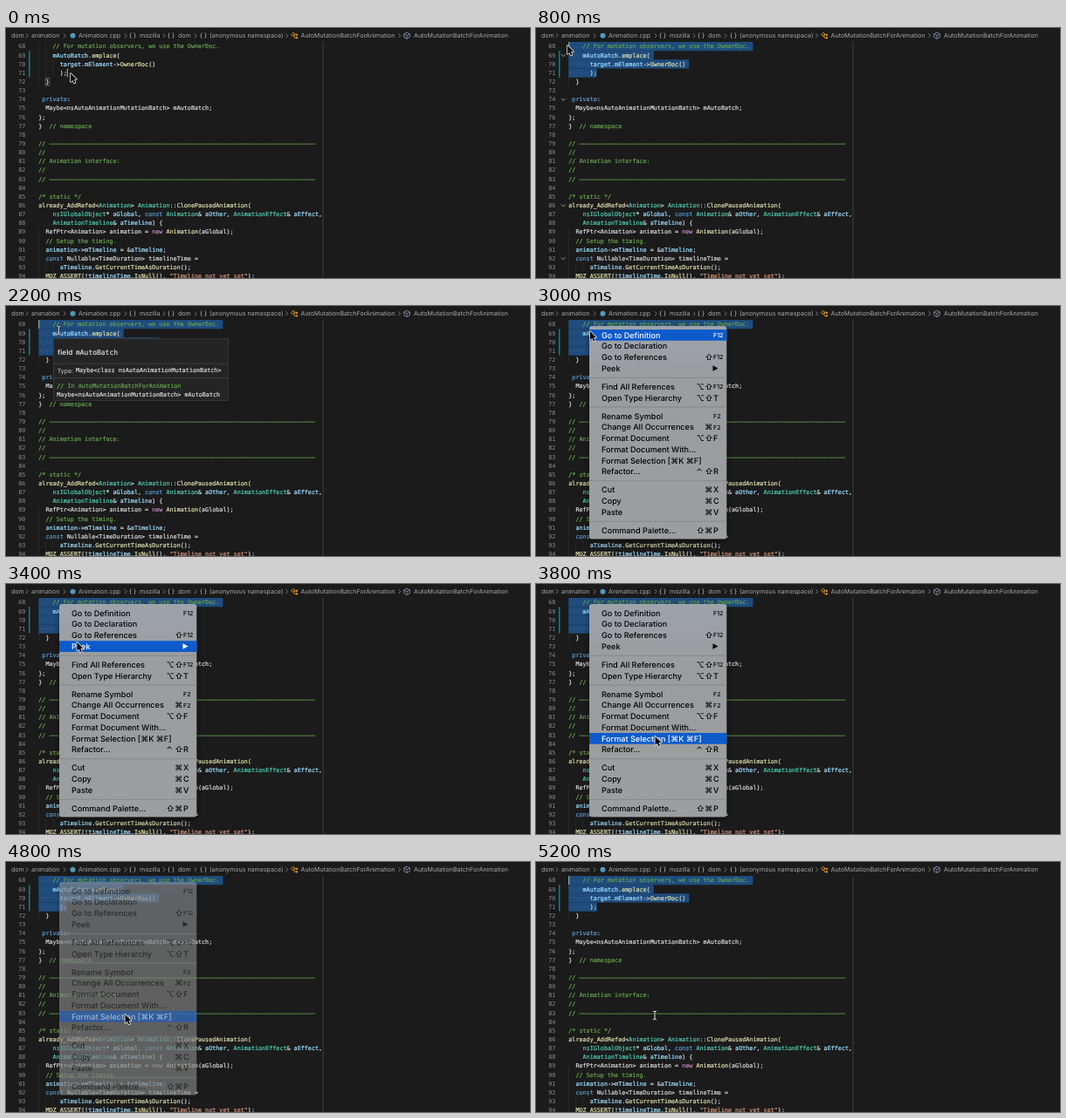
Write an HTML page with a canvas that moves like this. It is 600 by 287 pixels and loops after 5400 ms.

```html
<!DOCTYPE html>
<html lang="en">
<head>
<meta charset="utf-8">
<title>Code editor</title>
<style>
html, body { margin: 0; width: 100%; height: 100%; overflow: hidden; background: #1b1b1b; }
canvas { display: block; width: 600px; height: 287px; }
</style>
</head>
<body>
<canvas id="stage"></canvas>
<script>
const W = 600, H = 287, LOOP = 5400, STEP = 200;
const CW = 4.06, LH = 10.14, X0 = 37.3, FIRST = 68, TOP = 16;
const MONO = '"DejaVu Sans Mono", monospace', SANS = 'Inter, "DejaVu Sans", sans-serif';
const BG = '#1b1b1b';

const canvas = document.getElementById('stage');
const ctx = canvas.getContext('2d');
const dpr = window.devicePixelRatio || 1;
canvas.width = W * dpr;
canvas.height = H * dpr;

// First letter of each token picks its colour
const INK = {
  c: '#62a04a', w: '#d4d4d4', v: '#9cdcfe', f: '#dcdcaa',
  k: '#569cd6', t: '#4ec9b0', n: '#c586c0', s: '#ce9178'
};
const RULE = 'c// ' + '—'.repeat(75);
const CODE = [
  'w    |c// For mutation observers, we use the OwnerDoc.',
  'w    |vmAutoBatch|w.|femplace|w(',
  'w      |vtarget|w.|vmElement|w->|fOwnerDoc|w()',
  'w      );',
  'w  }',
  '',
  'w |kprivate|w:',
  'w  Maybe<nsAutoAnimationMutationBatch> mAutoBatch;',
  'w};',
  'w}  |c// namespace',
  '',
  RULE,
  'c//',
  'c// Animation interface:',
  'c//',
  RULE,
  '',
  'c/* static */',
  'falready_AddRefed|w<|tAnimation|w> |tAnimation|w::|fClonePausedAnimation|w(',
  'w    |tnsIGlobalObject|w* |vaGlobal|w, |kconst |tAnimation|w& |vaOther|w, |tAnimationEffect|w& |vaEffect|w,',
  'w    |tAnimationTimeline|w& |vaTimeline|w) {',
  'w  RefPtr<Animation> animation = |nnew |fAnimation|w(aGlobal);',
  'w  |c// Setup the timing.',
  'w  |vanimation|w->|vmTimeline|w = &|vaTimeline|w;',
  'w  |kconst |wNullable<TimeDuration> timelineTime =',
  'w      |vaTimeline|w.|fGetCurrentTimeAsDuration|w();',
  'w  |fMOZ_ASSERT|w(!|vtimelineTime|w.|fIsNull|w(), |s"Timeline not yet set"|w);'
].map(line => line ? line.split('|').map(p => [INK[p[0]], p.slice(1)]) : []);
const PLAIN = CODE.map(line => line.map(p => p[1]).join(''));

// Label, modifiers, key; null is a separator
const MENU = [
  ['Go to Definition', '', 'F12'], ['Go to Declaration'], ['Go to References', '⇧', 'F12'], ['Peek', '', '>'],
  null,
  ['Find All References', '⌥⇧', 'F12'], ['Open Type Hierarchy', '⌥⇧', 'T'],
  null,
  ['Rename Symbol', '', 'F2'], ['Change All Occurrences', '⌘', 'F2'], ['Format Document', '⌥⇧', 'F'],
  ['Format Document With...'], ['Format Selection [⌘K ⌘F]'], ['Refactor...', '⌃⇧', 'R'],
  null,
  ['Cut', '⌘', 'X'], ['Copy', '⌘', 'C'], ['Paste', '⌘', 'V'],
  null,
  ['Command Palette...', '⇧⌘', 'P']
];

// Mouse path: time, x, y
const PATH = [
  [0, 74, 52], [200, 74, 52], [800, 36, 20], [1000, 36, 20], [1400, 60.5, 28],
  [2400, 60.5, 28], [2600, 62, 29], [3200, 62, 29], [3800, 136.5, 175], [4800, 136.5, 175], [5000, 136, 176]
];

const rowY = i => TOP + i * LH;
const colX = c => X0 + c * CW;

function mouseAt(t) {
  const i = PATH.findIndex(p => p[0] > t);
  if (i < 0) return PATH[PATH.length - 1].slice(1);
  const [t0, x0, y0] = PATH[i - 1], [t1, x1, y1] = PATH[i];
  const u = (t - t0) / (t1 - t0), e = u * u * (3 - 2 * u);
  return [x0 + (x1 - x0) * e, y0 + (y1 - y0) * e];
}

function box(x, y, w, h, fill, r = 0) {
  ctx.fillStyle = fill;
  ctx.beginPath();
  ctx.roundRect(x, y, w, h, r);
  ctx.fill();
}

function path(points, color, width, close) {
  ctx.beginPath();
  points.forEach(([x, y], i) => i ? ctx.lineTo(x, y) : ctx.moveTo(x, y));
  if (close) ctx.closePath();
  ctx.strokeStyle = color;
  ctx.lineWidth = width;
  ctx.stroke();
}

function text(s, x, y, size, color, weight = 400) {
  ctx.font = `${weight} ${size}px ${SANS}`;
  ctx.fillStyle = color;
  ctx.fillText(s, x, y + size * 0.36);
}

// Monospaced text on a fixed cell grid, slightly emboldened
function mono(s, x, y, color, cell = CW, bold = 0.22) {
  const size = cell / 0.602, base = y + size * 0.35;
  ctx.font = `${size}px ${MONO}`;
  ctx.fillStyle = ctx.strokeStyle = color;
  ctx.lineWidth = bold;
  for (let i = 0; i < s.length; i++) {
    if (s[i] === ' ') continue;
    ctx.fillText(s[i], x + i * cell, base);
    if (bold) ctx.strokeText(s[i], x + i * cell, base);
  }
}

function breadcrumb() {
  const y = 8.7, gray = '#a9a9a9';
  const parts = [
    ['dom', 6], ['animation', 29], ['Animation.cpp', 83], ['mozilla', 153], ['dom', 197],
    ['(anonymous namespace)', 233], ['AutoMutationBatchForAnimation', 337.5], ['AutoMutationBatchForAnimation', 467]
  ];
  for (const [s, x] of parts) text(s, x, y, 7.08, gray);
  for (const x of [24, 67, 137, 181, 217, 321.5, 450.5])
    path([[x - 1.2, y - 2.5], [x + 1.2, y], [x - 1.2, y + 2.5]], '#8a8a8a', 0.8);
  for (const x of [141, 185, 222]) text('{ }', x, y, 7.2, '#c4c4c4');

  ctx.fillStyle = '#519aba';
  ctx.beginPath();
  ctx.arc(76.5, y, 3, 0, 7);
  ctx.fill();

  const orange = '#ee9d28';
  path([[326.5, y - 1], [329, y - 3.5], [330.8, y - 1.7], [328.3, y + 0.8]], orange, 0.9, true);
  path([[329.5, y - 0.8], [333, y - 0.8]], orange, 0.8);
  path([[330, y - 0.8], [330, y + 2.6], [333, y + 2.6]], orange, 0.8);
  box(332, y - 1.9, 2, 2, orange, 0.5);
  box(332, y + 1.6, 2, 2, orange, 0.5);

  const blue = '#8d9dbd', cx = 459;
  path([[cx, y - 3.6], [cx + 3.3, y - 1.8], [cx + 3.3, y + 1.9], [cx, y + 3.7], [cx - 3.3, y + 1.9], [cx - 3.3, y - 1.8]], blue, 0.8, true);
  path([[cx - 3.3, y - 1.8], [cx, y], [cx + 3.3, y - 1.8]], blue, 0.7);
  path([[cx, y], [cx, y + 3.7]], blue, 0.7);
}

function selection(row, col) {
  for (let i = row; i <= 3; i++) {
    const from = i === row ? col : 0, line = PLAIN[i];
    const to = line.length + (i < 3 ? 1 : 0);
    box(colX(from), rowY(i), (to - from) * CW, LH + 0.1, '#1f4c7d', 1);
    for (let c = from; c < line.length; c++)
      if (line[c] === ' ') box(colX(c) + 1.6, rowY(i) + 4.7, 0.9, 0.9, 'rgba(227,228,226,.17)');
  }
}

function editor(t, mouse) {
  // Indent guides
  const guide = (c, from, to) => box(colX(c), rowY(from), 0.6, (to - from) * LH, '#303030');
  guide(0, 0, 5);
  guide(2, 0, 4);
  guide(4, 2, 4);
  guide(0, 21, 27);
  guide(2, 25, 26);
  guide(4, 25, 26);

  let row = 3, col = PLAIN[3].length;
  if (t >= 200) {
    const [x, y] = t < 800 ? mouse : [36, 20];
    row = Math.max(0, Math.min(3, Math.floor((y - TOP) / LH)));
    col = Math.max(0, Math.min(PLAIN[row].length, Math.round((x - X0) / CW)));
    selection(row, col);
  } else {
    ctx.strokeStyle = '#888';
    ctx.lineWidth = 0.6;
    ctx.strokeRect(colX(2) - 0.2, rowY(4) + 0.7, CW + 0.6, LH - 1.4);
  }

  box(362.6, 16, 0.8, H, '#464646');
  CODE.forEach((line, i) => {
    const y = rowY(i) + LH / 2;
    mono(String(FIRST + i), 14.2, y, '#8c8c8c', CW, 0);
    let c = 0;
    for (const [color, s] of line) {
      mono(s, colX(c), y, color);
      c += s.length;
    }
  });
  box(26, rowY(1), 1.5, 3 * LH, '#0c7d9d');

  if (t >= 600 && t < 1400)
    for (const n of [69, 74, 86, 92]) {
      const y = rowY(n - FIRST) + LH / 2;
      path([[28.9, y - 1], [31.3, y + 1.4], [33.7, y - 1]], '#b8b8b8', 0.8);
    }
  if (t < 2600 || t >= 5000) box(colX(col), rowY(row) + 0.3, 0.9, LH - 0.4, '#c8c8c8');
}

function tooltip() {
  const x = 54, y = 37, w = 200.5, h = 72;
  box(x, y, w, h, '#454545');
  box(x + 0.6, y + 0.6, w - 1.2, h - 1.2, '#242425');
  box(x, 65.8, w, 0.7, '#454545');
  box(x, 82, w, 0.7, '#454545');
  text('field', 59, 52.8, 8.2, '#d8d8d8', 600);
  mono('mAutoBatch', 80, 52.8, '#d4d4d4', 4.8);
  text('Type:', 58.7, 74, 7, '#d0d0d0');
  mono('Maybe<class nsAutoAnimationMutationBatch>', 80, 74, '#d4d4d4');
  mono('// In AutoMutationBatchForAnimation', 58.3, 91.7, INK.c);
  mono('Maybe<nsAutoAnimationMutationBatch> mAutoBatch', 58.3, 101.5, '#d4d4d4');
}

function menu(my, alpha) {
  const x = 61, y = 23, w = 157.3, h = 244.5;
  ctx.save();
  ctx.globalAlpha = alpha;
  ctx.save();
  ctx.shadowColor = 'rgba(0,0,0,.5)';
  ctx.shadowBlur = 7 * dpr;
  ctx.shadowOffsetY = 3 * dpr;
  const shade = ctx.createLinearGradient(0, y, 0, y + h);
  shade.addColorStop(0, '#9da3aa');
  shade.addColorStop(0.3, '#9b9c9d');
  shade.addColorStop(1, '#9d9e9f');
  box(x, y, w, h, shade, 3);
  ctx.restore();

  let iy = 33.3;
  for (const item of MENU) {
    if (!item) {
      box(x, iy - 2.6, w, 1, '#868789');
      iy += 8.3;
      continue;
    }
    const [label, mods = '', key = ''] = item;
    const on = Math.abs(my - iy) <= 6.35;
    const ink = on ? '#fff' : '#000';
    if (on) box(x, iy - 6.35, w, 12.7, '#0d5bcb');
    text(label, 75, iy, 9.1, ink, 500);
    [...mods].forEach((m, i) => text(m, 203 - 9.7 * (mods.length - i), iy, 9.1, ink, 500));
    if (key === '>') {
      ctx.fillStyle = ink;
      ctx.beginPath();
      ctx.moveTo(202.5, iy - 3.2);
      ctx.lineTo(208.5, iy);
      ctx.lineTo(202.5, iy + 3.2);
      ctx.fill();
    } else text(key, 203, iy, key.length > 1 ? 7 : 9.1, ink, 500);
    iy += 12.75;
  }
  ctx.restore();
}

function arrow(x, y) {
  const shape = [[0, 0], [0, 10], [2.3, 7.9], [3.9, 11.5], [5.5, 10.8], [4, 7.3], [7, 7.1]].map(p => [p[0] + x, p[1] + y]);
  path(shape, '#eee', 1.5, true);
  ctx.fillStyle = '#080808';
  ctx.fill();
}

function beam(x, y) {
  const lines = [
    [[x - 2, y - 5], [x, y - 4.2], [x + 2, y - 5]],
    [[x, y - 4.2], [x, y + 4.2]],
    [[x - 2, y + 5], [x, y + 4.2], [x + 2, y + 5]]
  ];
  for (const l of lines) path(l, '#111', 2.2);
  for (const l of lines) path(l, '#eee', 1);
}

function draw(t) {
  ctx.setTransform(dpr, 0, 0, dpr, 0, 0);
  ctx.textRendering = 'geometricPrecision';
  ctx.textBaseline = 'alphabetic';
  ctx.lineJoin = 'round';
  box(0, 0, W, H, BG);
  const mouse = mouseAt(t);
  editor(t, mouse);
  breadcrumb();
  if (t >= 1600 && t < 2600) tooltip();
  const open = t >= 2600 && t < 5000;
  // The menu fades out after the click
  if (open) menu(mouse[1] + 2, 1 - Math.max(0, (t - 4400) / 600) ** 2);
  (open || t < 1200 ? arrow : beam)(...mouse);
}

const start = performance.now();
let last = -1;
function tick() {
  const t = Math.floor((performance.now() - start) % LOOP / STEP) * STEP;
  if (t !== last) draw(last = t);
  requestAnimationFrame(tick);
}
tick();
</script>
</body>
</html>
```
